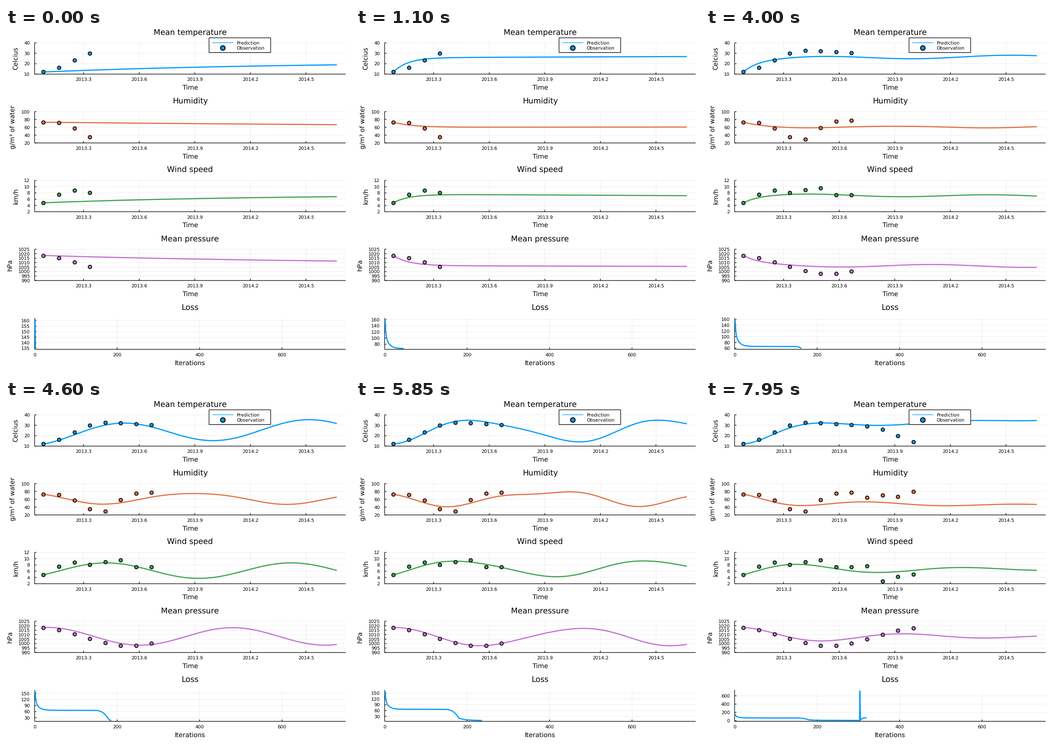
A matplotlib script that plays this animation: 748x748 px, repeating every 8000 ms.

```python
import numpy as np
import matplotlib.pyplot as plt
from matplotlib.animation import FuncAnimation
from matplotlib.patches import Rectangle

SIZE, DPI = 748, 100
FRAMES, INTERVAL = 160, 50
PT = 72 / DPI                       # points per pixel
MONTH, MONTHS = 33.58, 19
START = 81.4
SPAN = MONTH * MONTHS
LEFT, RIGHT = START - .03 * SPAN, START + 1.03 * SPAN
MID = (LEFT + RIGHT) / 2
BASE, HEIGHT, PITCH = 100.3, 68.1, SIZE / 5
UNIT = .8965                        # pixels per iteration
BLUE = "#009AFA"

plt.rcParams.update({"font.family": "DejaVu Sans", "text.hinting": "none",
                     "text.hinting_factor": 1, "path.snap": False})

fig = plt.figure(figsize=(SIZE / DPI, SIZE / DPI), dpi=DPI, facecolor="white")
ax = fig.add_axes([0, 0, 1, 1])
ax.set_xlim(0, SIZE)
ax.set_ylim(SIZE, 0)
ax.axis("off")


def ramp(n, a, b):
    return np.clip((n - a) / (b - a), 0, 1)


def mix(a, b, w):
    return a + (b - a) * w


# --- model: months k, training iteration n ---

def wave(k, level, amp, peak, period=12, amp2=0, peak2=0, trend=0, fade=0):
    """Seasonal swing with an optional second harmonic, drift and damping."""
    w = 2 * np.pi / period
    return (level + trend * k + amp * np.exp(-fade * k) * np.cos(w * (k - peak))
            + amp2 * np.cos(2 * w * (k - peak2)))


YEAR = np.arange(12)
OBSERVED = [
    wave(YEAR, 24.8, 9.5, 5.6, amp2=3, peak2=3),
    np.array([73, 72, 57.6, 34.6, 28.8, 58.9, 75, 77, 64.4, 70.3, 66.5, 79.4]),
    np.array([4.85, 7.5, 8.8, 8.1, 9, 9.6, 7.35, 7.4, 7.6, 2.85, 4.26, 5]),
    wave(YEAR, 1007.7, 10.2, 11.55),
]
FIRST = np.array([[12.05], [72.9], [4.85], [1018]])

U = np.linspace(0, 1, 240)
K = U * MONTHS
T = K / 12


def pose(*rows, **common):
    """Waves that all set out from the first observation."""
    y = np.array([wave(K, *r, **common) for r in rows])
    return y + (FIRST - y[:, :1]) * np.exp(-(K / 2.7)**2)


ROUGH = pose((21.5, 9.2, 5.1, 12, 0, 0, .27),
             (62.3, 13.9, 9.75, 12, 1.5, 6.75),
             (6.18, 2.48, 4.05),
             (1008, 9.8, 12.25))
FIT = pose((25, 9.95, 5.42, 12.35, 1.67, 3.5),
           (63.7, 16.9, 10.06, 12.35, 5.8, .22),
           (6.85, 2.5, 4.15, 12.35, .2, 2.1),
           (1007.6, 9.6, 12, 12.35, .74, 1.65))
DAMPED = pose((28.3, 4.2, 4.6, 9.8, 0, 0, .36),
              (50, 12, 8.2, 10, 0, 0, -.25),
              (6.6, 2.45, 3.5, 11),
              (1008, 8.5, 10.6, 10.6), fade=.1)

# level, yearly slope and rate of the curves before they learn the season
EARLY = np.array([[21.8, 0, .77], [53.4, 0, .25], [7.45, 0, .88],
                  [1008.3, 0, .65]])
SETTLED = np.array([[25.8, .7, 13], [60, .4, 10], [7.6, -.3, 12],
                    [1006.6, -.5, 12]])


def settle(n):
    p = mix(EARLY, SETTLED, 1 - np.exp(-(n - 2) / 9))
    level, slope, rate = (p[:, [i]] for i in range(3))
    return level + slope * T + (FIRST - level) * np.exp(-rate * T)


def drop(n):
    return ramp(n, 145, 180)**2.6


def predict(n):
    overshoot = .2 * np.sin(np.pi * ramp(n, 174, 186))
    y = mix(settle(n), ROUGH, drop(n) + overshoot)
    y = mix(y, FIT, 1 - (1 - ramp(n, 186, 236))**2)
    s = ramp(n, 303, 314)
    s = s * s * (3 - 2 * s)
    y = mix(y, DAMPED, s)
    y[0] += 3 * np.sin(np.pi * s) * U**2
    return y


SPIKE = 304
STEPS = np.arange(1, 2 * FRAMES + 1)
LOSS = np.select(
    [STEPS <= 180, STEPS < SPIKE, STEPS == SPIKE],
    [66.3 - 45.3 * drop(STEPS)
     + 52 * np.exp(-.115 * STEPS) + 89.5 * np.exp(-.6 * STEPS),
     10.5 - .035 * (STEPS - 180) + 10.5 * np.exp(-(STEPS - 180) / 12),
     718],
    71 - 64 * np.exp(-(STEPS - SPIKE - 1) / 3.5))


# --- drawing helpers, in stage pixels ---

def label(x, y, s, px, ha="center", **kw):
    return ax.text(x, y, s, fontsize=px * PT, ha=ha, va="baseline", **kw)


def line(xs, ys, color="black", px=1.25, z=2, **kw):
    return ax.plot(xs, ys, color=color, lw=px * PT, zorder=z,
                   solid_capstyle="butt", **kw)[0]


def grid(xs, ys):
    return line(xs, ys, px=.7, z=1, alpha=.1)


def dots(xs, ys, color, px, edge, z=4):
    return ax.plot(xs, ys, "o", color=color, ms=px * PT, mec="black",
                   mew=edge * PT, zorder=z)[0]


def y_tick(y, text):
    return (grid([LEFT, RIGHT], [y, y]), line([LEFT, LEFT + 4], [y, y]),
            label(52, y + 3.65, text, 10, "right"))


def draw_axes(row, title, xticks, xlabel):
    shift = PITCH * row
    bottom = BASE + shift
    top = bottom - HEIGHT
    line([LEFT, LEFT], [top, bottom])
    line([LEFT, RIGHT], [bottom, bottom])
    label(MID, 14.6 + shift, title, 17.5)
    label(MID, 134 + shift, xlabel, 13.75)
    for x, text in xticks:
        if x > LEFT:
            grid([x, x], [top, bottom])
            line([x, x], [bottom - 4, bottom])
        label(x, 115.3 + shift, text, 10)
    return top, bottom


# title, unit, unit baseline x, colour, low, high, tick step
PANELS = [
    ("Mean temperature", "Celcius", 25.2, BLUE, 10, 40, 10),
    ("Humidity", "g/m³ of water", 18.7, "#E36F47", 20, 100, 20),
    ("Wind speed", "km/h", 25.2, "#3EA44E", 2, 12, 2),
    ("Mean pressure", "hPa", 12.5, "#C371D2", 990, 1025, 5),
]
YEARS = [(168.7 + 120.9 * i, f"{2013.3 + .3 * i:.1f}") for i in range(5)]
curves, scatters, scales = [], [], []

for row, (title, unit, ux, color, low, high, step) in enumerate(PANELS):
    top, bottom = draw_axes(row, title, YEARS, "Time")
    label(ux, (top + bottom) / 2, unit, 13.75, rotation=90,
          rotation_mode="anchor")
    scale = HEIGHT / (high - low)
    for v in range(low, high + 1, step):
        y_tick(bottom - (v - low) * scale, str(v))
    curves.append(line([], [], color, 2.5, 3))
    scatters.append(dots([], [], color, 7.6, 1.6))
    scales.append((bottom, low, scale))

# legend
ax.add_patch(Rectangle((441.5, 21.4), 134, 32, fc="white", ec="black",
                       lw=1.25 * PT, zorder=6))
line([448.5, 494.5], [32, 32], BLUE, 1.25, 7)
dots([471.5], [42.8], BLUE, 10, 2, 7)
label(501, 35.7, "Prediction", 10, "left", zorder=7)
label(501, 46.7, "Observation", 10, "left", zorder=7)

# loss panel
top, floor = draw_axes(
    4, "Loss", [(LEFT + v * UNIT, str(v)) for v in range(0, 601, 200)],
    "Iterations")
loss_line = line([], [], BLUE, 2.5, 3)
loss_line.set_clip_path(Rectangle((LEFT, top), RIGHT - LEFT, HEIGHT,
                                  transform=ax.transData))
pool = [y_tick(floor, "") for _ in range(8)]


def loss_ticks(low, high):
    def ticks(s):
        return range(int(np.ceil(low / s)) * s, int(high) + 1, s)
    return min((ticks(s) for s in (5, 10, 20, 30, 50, 100, 200)),
               key=lambda t: abs(len(t) - 5))


def draw_loss(n):
    v = LOSS[:n]
    pad = .03 * np.ptp(v)
    low, high = v.min() - pad, v.max() + pad

    def to_y(q):
        return floor - (q - low) * HEIGHT / (high - low)

    loss_line.set_data(LEFT + STEPS[:n] * UNIT, to_y(v))
    marks = loss_ticks(low, high)
    for i, parts in enumerate(pool):
        for part in parts:
            part.set_visible(i < len(marks))
        if i < len(marks):
            y = to_y(marks[i])
            rule, tick, text = parts
            rule.set_ydata([y, y])
            tick.set_ydata([y, y])
            text.set_y(y + 3.65)
            text.set_text(str(marks[i]))


def draw(i):
    n = 2 * (i + 1)
    count = 4 if n < 152 else 8 if n < SPIKE else 12
    for row, values in enumerate(predict(n)):
        bottom, low, scale = scales[row]
        curves[row].set_data(START + K * MONTH, bottom - (values - low) * scale)
        seen = OBSERVED[row][:count]
        scatters[row].set_data(START + MONTH * YEAR[:count],
                               bottom - (seen - low) * scale)
    draw_loss(n)
    return []


anim = FuncAnimation(fig, draw, frames=FRAMES, interval=INTERVAL,
                     init_func=lambda: draw(0), repeat=True, repeat_delay=0)
plt.show()
```
